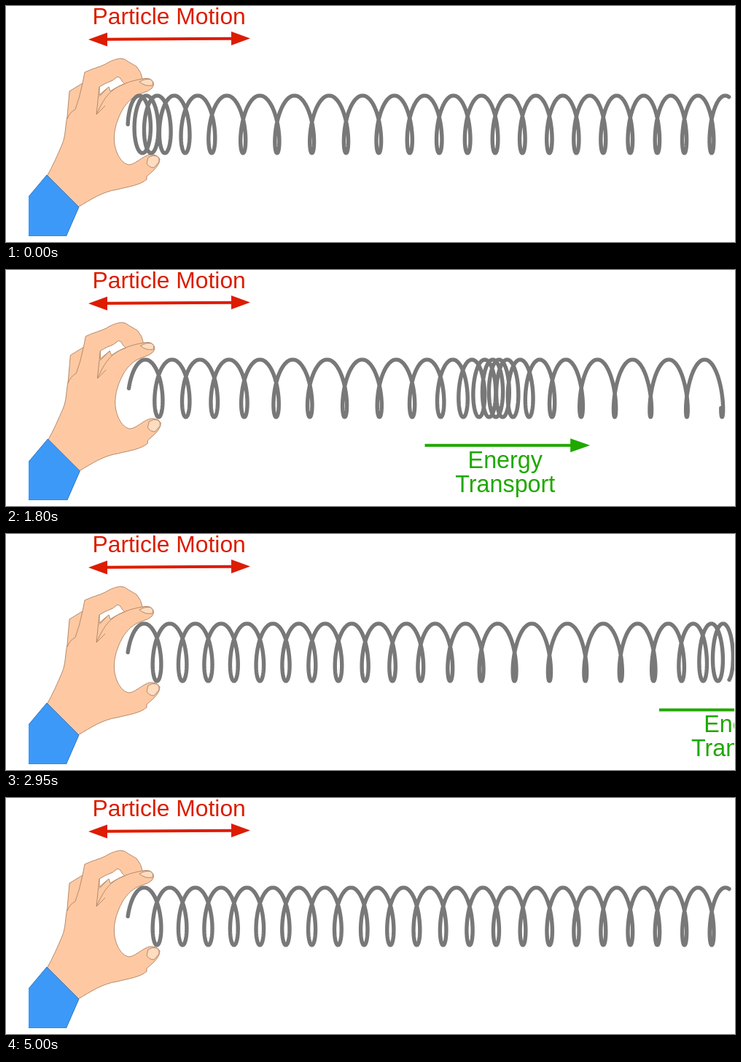
An HTML page that plays this animation: 1000 px wide and 324 px high, repeating every 5750 ms.

```html
<!DOCTYPE html>
<html lang="en">
<head>
<meta charset="utf-8">
<title>Longitudinal wave in a spring</title>
<style>
  html, body { margin: 0; width: 100%; height: 100%; overflow: hidden; background: #fff; }
  svg { display: block; width: 100vw; height: 100vh; }
  text { font: 32.3px "Liberation Sans", Arial, sans-serif; }
  .red { fill: #dd1c00; stroke: none; }
  .green { fill: #1fa800; stroke: none; }
  #hand { stroke: #b58a6c; stroke-width: 1; stroke-linejoin: round; }
  .skin { fill: #fec9a2; }
  .nail { fill: #fedcc0; }
  .gap { fill: #fff; }
  .crease { fill: none; }
</style>
</head>
<body>
<svg viewBox="0 0 1000 324">
  <clipPath id="frame"><rect x="31" width="968" height="316"/></clipPath>

  <text class="red" x="118.5" y="25" style="font-size:31.8px">Particle Motion</text>
  <path class="red" d="M113 46L139 36.500V43.800L309 42.700V35L335 44.500L309 54V46.700L139 47.800V55.500Z"/>

  <g clip-path="url(#frame)">
    <g id="hand">
      <path class="skin" d="M56 234C64 220 70 206 77 190C82 178 81 166 84 152L87 117L105 106L108 91
        C118 86 128 84 136 80C144 75 150 73 157 72Q163 72 167 76L179 83Q186 91 187 100
        Q196 98 200 102Q205 107 200 113Q196 117 186 120C174 124 166 132 160 142
        C150 160 147 176 149 190C152 206 160 217 169 218C178 217 186 207 197 204
        Q207 203 211 210Q211 217 203 225L193 234L193 238C184 246 168 248 152 252
        C132 255 116 266 99 276Z"/>
      <path class="gap" d="M128 111L137 106Q147 103 153 97Q158 98 159 103L163 107C154 110 148 114 143 117L141 111L128 122Z"/>
      <path class="crease" d="M187 100C170 103 156 108 146 116C136 124 130 136 124 149L128 111
        M105 106Q101 126 95 142Q87 146 84 155M128 124L141 111M124 149L136 137"/>
      <path class="nail" d="M183 104Q191 99 199 101Q203 104 201 109Q191 111 183 104Z"/>
      <path class="nail" d="M195 208Q201 204 207 206Q211 209 210 214L203 222Q196 222 193 216Z"/>
      <path d="M56 232L100 276L82.500 316H-12V313Z" fill="#3d99f8" stroke="#2f76c0"/>
    </g>
    <path id="spring" fill="none" stroke="#787878" stroke-width="5.4" stroke-linejoin="round" stroke-linecap="round"/>
    <g id="energy" class="green" text-anchor="middle">
      <path id="arrow"/>
      <text y="271.600">Energy</text>
      <text y="304.600">Transport</text>
    </g>
  </g>
</svg>
<script>
  const STEP = 50, LOOP = 5750, LAST = 5000, LABEL_START = 600;
  const TURN_START = 0.25, RIGHT_END = 989;
  const PULSE_SPEED = 0.00763, PULSE_WIDTH = 4.1, PULSE_HEIGHT = 1.91;  // in turns
  const $ = id => document.getElementById(id);

  // Rest position of the coil axis after a number of turns
  const restX = turn => 207 + 35.1 * (turn - 1) + 0.054 * (turn - 1) ** 2;

  // The pulse shifts each turn by the derivative of a Gaussian, with peaks of PULSE_HEIGHT
  function axisX(turn, t) {
    const u = (turn - TURN_START - PULSE_SPEED * t) / PULSE_WIDTH;
    return restX(turn - PULSE_HEIGHT * u * Math.exp((1 - u * u) / 2));
  }

  function springPath(t) {
    const points = [];
    for (let turn = TURN_START; turn < 32; turn += 0.02) {
      const axis = axisX(turn, t);
      if (axis > RIGHT_END) break;
      const angle = 2 * Math.PI * turn;
      const radius = 13.6 - 0.14 * turn;
      points.push((axis - radius * Math.sin(angle)).toFixed(2) + " " +
                  (162.5 + 39.5 * Math.cos(angle)).toFixed(2));
    }
    return "M" + points.join("L");
  }

  function arrowPath(since) {
    const scale = 1 + 1.9e-5 * since;
    const tail = -108 * scale, tip = 114 * scale, neck = tip - 27;
    const y = 240 + 0.0007 * since;
    return `M${tail} ${y - 2}H${neck}V${y - 9.5}L${tip} ${y}L${neck} ${y + 9.5}V${y + 2}H${tail}Z`;
  }

  function draw(t) {
    const handShift = axisX(TURN_START, t) - restX(TURN_START);
    $("hand").setAttribute("transform", `translate(${handShift})`);
    $("spring").setAttribute("d", springPath(t));
    const since = t - 700;
    const labelX = 384 + 0.2695 * since + 3.58e-6 * since * since;
    $("energy").setAttribute("visibility", t >= LABEL_START ? "visible" : "hidden");
    $("energy").setAttribute("transform", `translate(${labelX})`);
    $("arrow").setAttribute("d", arrowPath(since));
  }

  const start = performance.now();
  function tick() {
    const elapsed = (performance.now() - start) % LOOP;
    draw(Math.min(LAST, Math.floor(elapsed / STEP) * STEP));
    requestAnimationFrame(tick);
  }
  tick();
</script>
</body>
</html>
```
